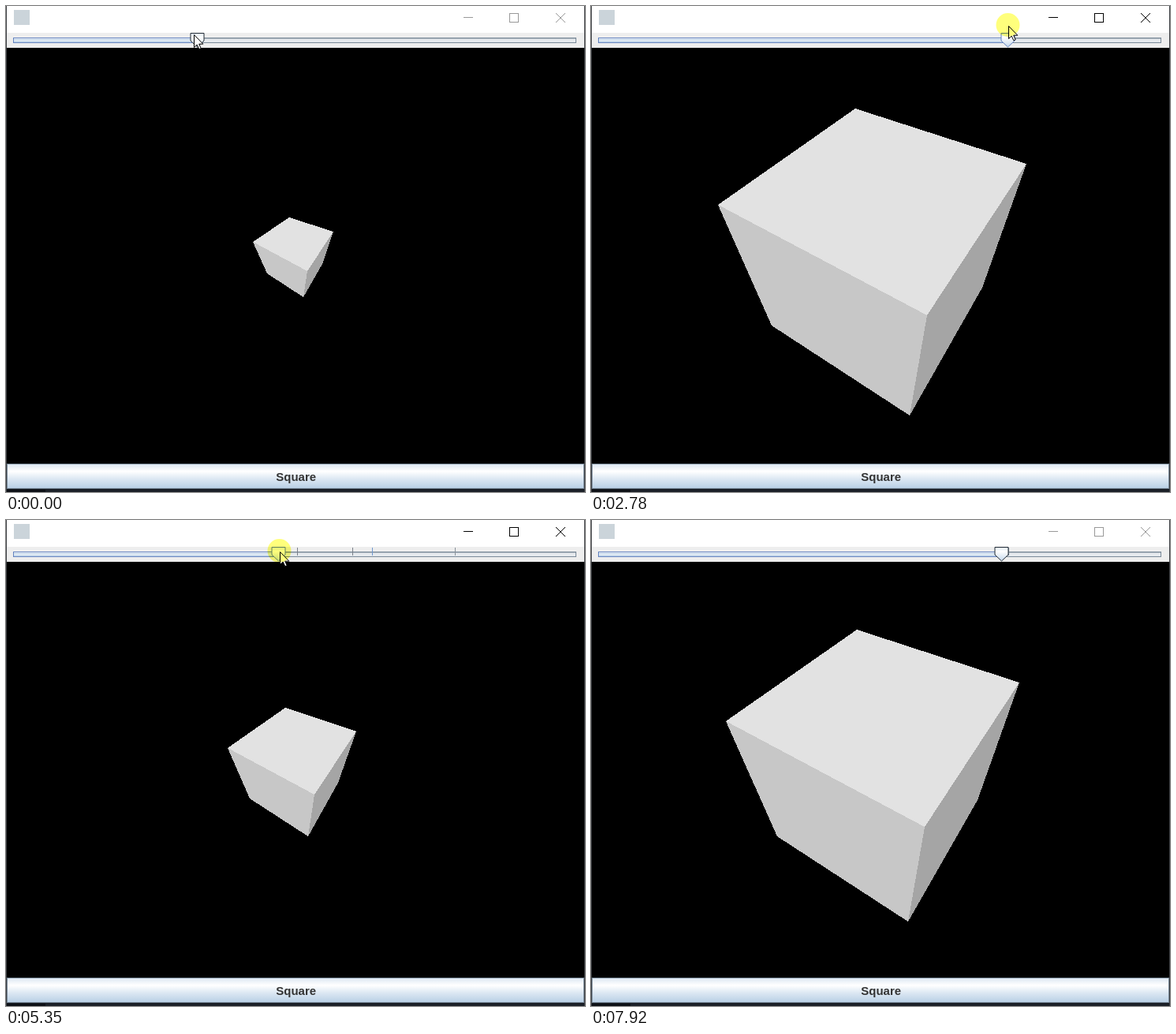
These frames come from a looping animation (734x616 px, 7940 ms). An HTML page:

```html
<!DOCTYPE html>
<html lang="en">
<head>
<meta charset="utf-8">
<title>Cube zoom slider</title>
<style>
html, body { margin: 0; width: 100%; height: 100%; overflow: hidden; background: #000; }
svg { display: block; width: 734px; height: 616px; }
text { font: bold 15px "Liberation Sans", Arial, sans-serif; fill: #333; text-anchor: middle; }
.crisp { shape-rendering: crispEdges; }
#spot { fill: #ffff7c; mix-blend-mode: multiply; }
</style>
</head>
<body>
<svg viewBox="0 0 734 616">
  <defs>
    <linearGradient id="metal" x1="0" y1="0" x2="0" y2="1">
      <stop offset="0" stop-color="#dde8f3"/>
      <stop offset=".3" stop-color="#fff"/>
      <stop offset=".6" stop-color="#dde8f3"/>
      <stop offset="1" stop-color="#b8cfe5"/>
    </linearGradient>
    <linearGradient id="knob" x1="0" y1="0" x2="0" y2="1">
      <stop offset="0" stop-color="#dce9f5"/>
      <stop offset=".3" stop-color="#fff"/>
      <stop offset="1" stop-color="#c4d8ec"/>
    </linearGradient>
  </defs>

  <rect width="734" height="616"/>
  <g id="cube" class="crisp">
    <polygon fill="#e2e2e2"/>
    <polygon fill="#c7c7c7"/>
    <polygon fill="#a5a5a5"/>
  </g>

  <g class="crisp">
    <rect y="579" width="734" height="1"/>
    <rect y="612" width="734" height="4" fill="#1b2028"/>
    <rect y="613" width="50" height="3" fill="#0d1016"/>
    <rect x="1.5" y="580.5" width="731" height="31" fill="url(#metal)" stroke="#7a8a99"/>
    <rect width="734" height="34" fill="#fff"/>
    <rect y="34" width="734" height="19" fill="#eee"/>
    <rect id="hover" x="557" width="58" height="33" fill="#dfe6ed"/>
    <rect x="10" y="5" width="20" height="19" fill="#cbd4da"/>
    <rect width="1" height="616" fill="#3c3f43"/>
    <rect x="733" width="1" height="616" fill="#3c3f43"/>
  </g>
  <text x="367.7" y="602">Square</text>

  <g id="controls" fill="none">
    <path class="crisp" d="M580 14.5h12M638.5 9.5h11v11h-11z"/>
    <path d="M697 9l12 12m0-12l-12 12"/>
  </g>

  <g class="crisp">
    <rect x="9.5" y="40.5" width="713" height="6" fill="#e6eaee" stroke="#7a8a99"/>
    <path d="M10 41.5h712" stroke="#b4bcc4"/>
    <g id="filled">
      <rect x="9.5" y="40.5" height="6" fill="#f2f6fa"/>
      <rect x="10" y="42" height="1" fill="#b8cfe5" stroke="none"/>
      <rect x="10" y="44" height="2" fill="#c8daeb" stroke="none"/>
    </g>
    <g id="ticks"></g>
  </g>
  <path id="thumb" d="M-8.5 34.5h17v9.5l-8.5 8l-8.5-8z" fill="url(#knob)"/>
  <path id="cursor" d="M.5 .5v16l3.7-3.4l2.6 5.6l2.4-1l-2.5-5.5h5.1z" fill="#fff" stroke="#000"/>
  <circle id="spot" r="15"/>
</svg>
<script>
const LOOP = 7940;
const get = id => document.getElementById(id);

// time, thumb centre
const SLIDE = [[0, 242], [650, 242], [2320, 462], [3120, 577], [4700, 577],
  [5350, 345], [5600, 275], [6150, 521], [6220, 520], [LOOP, 520]];
// time, pointer tip x and y
const POINTER = [[0, 238, 36], [650, 240, 36], [2320, 463, 28], [3120, 577, 22],
  [3340, 575, 33], [3600, 575, 44], [4460, 575, 44], [4700, 578, 40], [5350, 347, 40],
  [5600, 277, 40], [6150, 523, 40], [6250, 522, 41], [6600, 678, 468], [6800, 760, 640]];
// thumb centre, log of cube scale
const ZOOM = [[242, .193], [345, .31], [462, .529], [520, .706], [577, 1]]
  .map(([x, s]) => [x, Math.log(s)]);
// x, start, end, colour of the trails left beside the thumb
const TRAILS = [[569, 4700, 6150, "#8a929a"], [464, 4700, 6150, "#6f97cc"],
  [439, 4700, 6150, "#7a7f88"], [369, 4700, 6150, "#7a7f88"], [529, 6200, LOOP, "#7a8a99"]];

const VERTS = { back: [-43, -251], right: [249, -156], front: [79, 103], left: [-278, -86],
  lowLeft: [-186, 120], lowFront: [50, 274], lowRight: [174, 55] };
const FACES = [["back", "right", "front", "left"], ["left", "front", "lowFront", "lowLeft"],
  ["front", "right", "lowRight", "lowFront"]];

function sample(table, at, col = 1) {
  let i = 1;
  while (i < table.length - 1 && table[i][0] < at) i++;
  const a = table[i - 1], b = table[i];
  const k = Math.min(1, (at - a[0]) / (b[0] - a[0]));
  return a[col] + (b[col] - a[col]) * k;
}
const within = (t, a, b) => t >= a && t < b;
const show = (el, on) => el.setAttribute("visibility", on ? "visible" : "hidden");

const faces = [...get("cube").children];
const bars = [...get("filled").children];
const ticks = TRAILS.map(([x, , , color]) => {
  const line = document.createElementNS("http://www.w3.org/2000/svg", "path");
  line.setAttribute("d", `M${x + .5} 35v10`);
  line.setAttribute("stroke", color);
  return get("ticks").appendChild(line);
});

function draw(t) {
  const thumb = Math.round(sample(SLIDE, t));
  const scale = Math.exp(sample(ZOOM, thumb));
  faces.forEach((face, i) => face.setAttribute("points", FACES[i].map(name => {
    const [x, y] = VERTS[name];
    return `${Math.round(367 + x * scale)},${Math.round(316 + y * scale)}`;
  }).join(" ")));

  const active = within(t, 600, 7490);
  const rollover = within(t, 3450, 4680);
  get("controls").setAttribute("stroke", active ? "#000" : "#999");
  get("thumb").setAttribute("stroke", !active ? "#222a33" : rollover ? "#5b9bd0" : "#6382bf");
  get("thumb").setAttribute("transform", `translate(${thumb + .5} 0)`);
  get("filled").setAttribute("stroke", rollover ? "#7f9ab3" : "#6382bf");
  bars.forEach(bar => bar.setAttribute("width", thumb - 9));
  ticks.forEach((tick, i) => {
    const [x, from, to] = TRAILS[i];
    show(tick, within(t, from, to) && thumb + 9 <= x);
  });

  const x = Math.round(sample(POINTER, t, 1)), y = Math.round(sample(POINTER, t, 2));
  const move = `translate(${x} ${y})`;
  get("cursor").setAttribute("transform", move);
  get("spot").setAttribute("transform", `translate(${x - .5} ${y - 1})`);
  show(get("cursor"), t < 6800);
  show(get("spot"), within(t, 600, 3150) || within(t, 4680, 6230));
  get("hover").setAttribute("opacity", within(t, 3180, 3540) ? Math.min(1, (3540 - t) / 180) : 0);
}

const start = performance.now();
function tick() {
  draw((performance.now() - start) % LOOP);
  requestAnimationFrame(tick);
}
tick();
</script>
</body>
</html>
```
